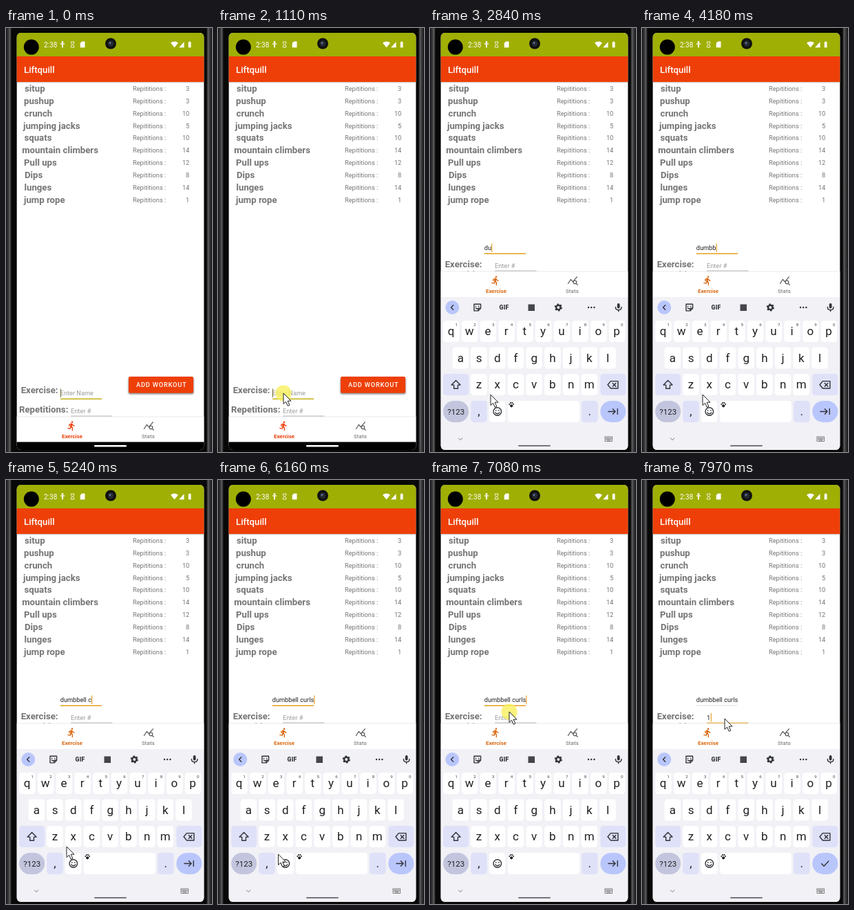
An HTML page that plays this animation: 299 px wide and 613 px high, repeating every 8 s.

```html
<!DOCTYPE html>
<html lang="en">
<head>
<meta charset="utf-8">
<title>Workout tracker</title>
<style>
html, body { margin: 0; width: 100%; height: 100%; overflow: hidden; background: #1d1d1f; }
svg { display: block; font-family: Roboto, sans-serif; }
text { white-space: pre; }
.b { font-weight: 700; font-size: 13.2px; fill: #757575; }
.s { font-size: 9.24px; fill: #757575; }
.hint { fill: #9b9b9b; }
.key { font-size: 17px; fill: #202124; text-anchor: middle; }
.ic { fill: none; stroke: #303338; stroke-width: 1.4; stroke-linecap: round; stroke-linejoin: round; }
</style>
</head>
<body>
<svg id="stage" width="299" height="613" viewBox="0 0 299 613">
  <defs>
    <clipPath id="screen"><rect x="15.7" y="7" width="271.6" height="603" rx="6"/></clipPath>
    <clipPath id="page"><rect id="pageBox" x="15" y="78" width="273" height="484"/></clipPath>
    <linearGradient id="rim">
      <stop offset="0" stop-color="#161618"/>
      <stop offset=".45" stop-color="#3c3c3e"/>
      <stop offset=".7" stop-color="#5c5c5e"/>
      <stop offset="1" stop-color="#0a0a0a"/>
    </linearGradient>
    <linearGradient id="shade" x2="0" y2="1">
      <stop offset="0" stop-opacity=".22"/>
      <stop offset="1" stop-opacity="0"/>
    </linearGradient>
    <filter id="blur" x="-10%" y="-30%" width="120%" height="170%"><feGaussianBlur stdDeviation="1.2"/></filter>
  </defs>
  <rect width="299" height="613" fill="#080808"/>
  <rect width="8" height="613" fill="url(#rim)"/>
  <rect width="8" height="613" fill="url(#rim)" transform="translate(299 0) scale(-1 1)"/>
  <g clip-path="url(#screen)">
    <rect x="15" y="7" width="273" height="603" fill="#fff"/>
    <rect x="15" y="7" width="273" height="34.5" fill="#a0af04"/>
    <rect x="15" y="41" width="273" height="37" fill="#ee3f09"/>
    <rect x="15" y="78" width="273" height="2.2" fill="url(#shade)"/>
    <text x="26" y="65" font-size="13.2" font-weight="500" fill="#fff">Liftquill</text>

    <!-- status bar -->
    <circle cx="36.8" cy="27.6" r="11" fill="#000"/>
    <circle cx="152" cy="22.5" r="8" fill="#111"/>
    <circle cx="152" cy="22.5" r="4.2" fill="#242a35"/>
    <circle cx="151" cy="21.5" r="1.5" fill="#62708a"/>
    <text x="55" y="27.5" font-size="10" fill="#fff">2:38</text>
    <g fill="#fff">
      <circle cx="82" cy="20.5" r="1.4"/>
      <path d="M78.8 22.3h6.4v1.2h-2.2v4.7h-2v-4.7h-2.2z"/>
      <path d="M94.3 20h4.6v1.5l-1.7 2.4 1.7 2.4v1.5h-4.6v-1.5l1.7-2.4-1.7-2.4z" fill="none" stroke="#fff" stroke-width=".9"/>
      <path d="M110.2 19.5h4.3v8.7h-6.8v-6.2z"/>
      <path d="M239 21.5q5.5-4 11 0l-5.5 6.8zM251 28.2l7.5-8.2v8.2zM264.7 20.3h1v-.9h1.8v.9h1v7.9h-3.8z"/>
    </g>

    <g id="list"></g>

    <g clip-path="url(#page)">
      <text id="label1" class="b" x="21.7" y="528">Exercise:</text>
      <text id="label2" class="b" x="19" y="555.5">Repetitions:</text>
      <g id="button">
        <rect x="177.5" y="505.5" width="95" height="24" rx="2.5" opacity=".45" filter="url(#blur)"/>
        <rect x="178" y="504" width="94" height="23.8" rx="2.2" fill="#ee3f09"/>
        <text x="189" y="519.3" font-size="9.24" font-weight="500" letter-spacing=".82" fill="#fff">ADD WORKOUT</text>
      </g>
      <g id="form">
        <text id="name" class="s" x="78.7" y="531.3"></text>
        <rect id="line1" x="79" y="535.6" width="60"/>
        <text id="reps" class="s" x="94" y="556.6"></text>
        <rect id="line2" x="94" y="560.7" width="60.5"/>
        <rect id="caret" width="1.1" height="12.5"/>
      </g>
    </g>

    <g id="nav">
      <rect x="15" y="562" width="273" height="37.3" fill="#fff"/>
      <rect x="15" y="561.6" width="273" height=".8" fill="#e4e4e4"/>
      <g id="active">
        <path transform="translate(87.4 567.6) scale(.64)" d="M13.5 5.5c1.1 0 2-.9 2-2s-.9-2-2-2-2 .9-2 2 .9 2 2 2zm-3.6 13.9l1-4.4 2.1 2v6h2v-7.5l-2.1-2 .6-3c1.3 1.5 3.3 2.5 5.5 2.5v-2c-1.9 0-3.5-1-4.3-2.4l-1-1.6c-.4-.6-1-1-1.7-1-.3 0-.5.1-.8.1L6 8.3V13h2V9.6l1.8-.7-1.6 8.1-4.9-1-.4 2z"/>
        <text x="96" y="593" font-size="7.92" font-weight="700" text-anchor="middle">Exercise</text>
      </g>
      <g class="ic" style="stroke:#666">
        <path d="M200.5 579.5l3.8-6 3 3.4 6-7M212.2 579.2l2 2.2"/>
        <circle cx="210.4" cy="577.4" r="2.3"/>
      </g>
      <text x="206.5" y="593" font-size="7.92" letter-spacing=".2" fill="#666" text-anchor="middle">Stats</text>
    </g>
    <rect id="bar" x="15" y="598.5" width="273" height="12" fill="#000"/>
    <g id="kb"></g>
    <rect id="pill" x="128" y="603" width="47" rx="1"/>
    <g id="barIcons" class="ic" style="stroke:#777;stroke-width:1">
      <path d="M41.5 593l2.7 2.7 2.7-2.7"/>
      <path d="M254 591h10.5v6.5H254zM255.6 593h7.5M255.6 594.6h7.5M257 596.2h4.5" stroke-dasharray="1.1 .7"/>
    </g>
  </g>
  <circle id="halo" r="11.6" fill="#f8f05c" opacity=".8"/>
  <path id="mouse" d="M0 0V15.5L3.6 12.2 6.2 18.3 8.8 17.2 6.2 11.2H11z" fill="#fff" stroke="#222" stroke-width="1" stroke-linejoin="round"/>
</svg>
<script>
const $ = id => document.getElementById(id);
const NS = 'http://www.w3.org/2000/svg';

function add(parent, tag, attrs, text) {
  const el = document.createElementNS(NS, tag);
  for (const k in attrs) el.setAttribute(k, attrs[k]);
  if (text !== undefined) el.textContent = text;
  parent.append(el);
  return el;
}
function set(id, attrs) {
  for (const k in attrs) $(id).setAttribute(k, attrs[k]);
}
const show = (id, on) => set(id, { visibility: on ? 'visible' : 'hidden' });
const within = (t, a, b) => t >= a && t < b;

// Workout list
const workouts = [
  ['situp', 27, 3], ['pushup', 26, 3], ['crunch', 26.5, 10], ['jumping jacks', 25, 5],
  ['squats', 26.5, 10], ['mountain climbers', 23.2, 14], ['Pull ups', 26, 12],
  ['Dips', 27, 8], ['lunges', 26.5, 14], ['jump rope', 26, 1]
];
workouts.forEach(([name, x, count], i) => {
  const y = 92 + i * 17.85;
  add($('list'), 'text', { class: 'b', x, y }, name);
  add($('list'), 'text', { class: 's', x: 184, y: y - 1 }, 'Repititions :');
  add($('list'), 'text', { class: 's', x: 266.3, y: y - 1, 'text-anchor': 'end' }, count);
});

// Keyboard
const kb = $('kb');
const LILAC = '#dfe1f9', BLUE = '#b9c6fc';
const box = (x, y, w, fill = '#fff', rx = 4.5) =>
  add(kb, 'rect', { x, y, width: w, height: 31, rx, fill });
const icon = (d, extra) => add(kb, 'path', { class: 'ic', d, ...extra });
const pitch = 26.72;

add(kb, 'rect', { x: 15, y: 389, width: 273, height: 225, fill: '#f1f1f6' });
add(kb, 'circle', { cx: 32.3, cy: 404, r: 10, fill: BLUE });
icon('M33.8 400.8l-3.2 3.2 3.2 3.2');
icon('M64 399.3h9.6v6l-3.6 3.6h-6zM73.6 405.3h-3.6v3.6M66.6 402.3v.4M70.8 402.3v.4M66.5 405q1.5 1.5 3 .6');
add(kb, 'text', { x: 107.5, y: 407, 'font-size': 8.6, 'font-weight': 900, fill: '#303338', 'text-anchor': 'middle', 'letter-spacing': .3 }, 'GIF');
add(kb, 'rect', { x: 142.5, y: 399.5, width: 9.5, height: 9.5, fill: '#44464c' });
add(kb, 'circle', { cx: 186.3, cy: 404, r: 3.2, class: 'ic', style: 'stroke-width:2.4' });
add(kb, 'circle', { cx: 186.3, cy: 404, r: 4.8, class: 'ic', style: 'stroke-width:1.6;stroke-linecap:butt', 'stroke-dasharray': '2.5 2.53' });
for (const x of [230, 234.2, 238.4]) add(kb, 'circle', { cx: x, cy: 404, r: 1.2, fill: '#303338' });
add(kb, 'rect', { x: 271.7, y: 398, width: 3.8, height: 7.4, rx: 1.9, fill: '#303338' });
icon('M269.3 403.5q0 4.2 4.3 4.2t4.3-4.2M273.6 407.7v2');

[['qwertyuiop', 31, 423], ['asdfghjkl', 44.3, 461.5], ['zxcvbnm', 71, 500]].forEach(([row, x0, y], r) => {
  [...row].forEach((ch, i) => {
    const x = x0 + i * pitch;
    box(x - 11.8, y, 23.6);
    add(kb, 'text', { class: 'key', x: x - (r ? 0 : .5), y: y + 21.3 }, ch);
    if (!r) add(kb, 'text', { x: x + 5.6, y: y + 7.8, 'font-size': 6.2, fill: '#444' }, (i + 1) % 10);
  });
});
box(19.2, 500, 37, LILAC);
icon('M37.6 509.5l6.4 6.6h-3.5v5.2h-5.8v-5.2h-3.5z');
box(247.3, 500, 37, LILAC);
icon('M262.3 510.6h10.6v10.4h-10.6l-4.3-5.2zM265.2 513.4l4.6 4.8M269.8 513.4l-4.6 4.8');
box(19.2, 539, 37, '#c2c5dd', 15.5);
add(kb, 'text', { x: 37.7, y: 559, 'font-size': 11.5, fill: '#202124', 'text-anchor': 'middle' }, '?123');
box(59.2, 539, 23.6, LILAC);
add(kb, 'text', { class: 'key', x: 71, y: 560 }, ',');
box(86, 539, 23.6);
add(kb, 'circle', { class: 'ic', cx: 97.8, cy: 554.5, r: 5.8 });
icon('M95.7 552.7v.5M99.9 552.7v.5M94.8 556q3 3.6 6 0');
box(112.8, 539, 104.2);
for (const [cx, cy, r] of [[115.3, 544, 1], [117, 542, 1.1], [119.4, 542, 1.1], [121.1, 544, 1], [118.2, 546.3, 2.1]])
  add(kb, 'circle', { cx, cy, r, fill: '#222' });
box(220, 539, 23.6, LILAC);
add(kb, 'text', { class: 'key', x: 231.8, y: 560 }, '.');
box(247.3, 539, 37, BLUE, 15.5);
icon('M258.8 554.5h10M265.3 550.8l3.7 3.7-3.7 3.7M272.2 550.5v8', { id: 'next' });
icon('M260.7 554.8l3.4 3.4 6.8-7.2', { id: 'done' });

// Typing moments, one per letter
const phrase = 'dumbbell curls';
const typed = [2710, 2840, 3110, 3260, 4180, 4440, 4640, 4840, 5040, 5240, 5370, 5500, 5700, 5830];

// Pointer moves: start, end, steps, from x, from y, to x, to y
const moves = [
  [280, 780, 8, 284, 608, 95, 528],
  [2240, 2440, 3, 95, 528, 88, 530],
  [6160, 6940, 12, 87.5, 541, 115, 335],
  [7150, 7290, 3, 115, 335, 117, 346],
  [7490, 7900, 6, 117, 346, 120, 345]
];
function pointer(t) {
  const m = moves.filter(v => t >= v[0]).pop();
  if (!m) return null;
  const [a, b, n, x0, y0, x1, y1] = m;
  const step = Math.min(n - 1, Math.floor((t - a) / (b - a) * (n - 1) + 1e-6));
  const p = a === 6160 ? step / (n - 1) : (step + 1) / n;
  const e = p * p * (3 - 2 * p);
  return [x0 + (x1 - x0) * e, y0 + (y1 - y0) * e];
}

const caretOff = [[500, 1040], [1510, 2240], [3780, 4180], [6330, 6830]];

function field(id, value, hint) {
  $(id).textContent = value || hint;
  $(id).setAttribute('class', value ? 's' : 's hint');
  $(id).style.fill = value ? '#222' : '';
  return value ? $(id).getComputedTextLength() : 0;
}

function draw(t) {
  const up = t >= 1510, second = t >= 7290;
  const lift = up ? -210 : 0;
  const accent = up ? '#e39a12' : '#c2ab0b';

  set('form', { transform: `translate(0 ${lift})` });
  set('nav', { transform: `translate(0 ${lift})` });
  set('active', { fill: up ? '#d9660f' : '#ee3f09' });
  set('pageBox', { height: 484 + lift });
  set('label1', { y: up ? 346 : 528 });
  set('label2', { y: up ? 361 : 555.5 });
  show('button', !up);
  show('bar', !up);
  show('kb', up);
  set('kb', { transform: `translate(0 ${t < 1640 ? 60 : 0})` });
  show('barIcons', t >= 1710);
  set('pill', { fill: t >= 1710 ? '#77777b' : '#fff', height: up ? 2 : 2.6 });
  show('next', up && t < 7490);
  show('done', t >= 7490);

  const w1 = field('name', phrase.slice(0, typed.filter(v => t >= v).length), 'Enter Name');
  const w2 = field('reps', t >= 7970 ? '1' : '', 'Enter #');
  set('line1', { fill: second ? '#d8d8d8' : accent, height: second ? .8 : 1.4 });
  set('line2', { fill: second ? accent : '#8d8d8d', height: second ? 1.4 : .8 });
  set('caret', {
    x: second ? 94 + w2 + .5 : 79 + w1 - .2,
    y: second ? 547 : 521.5,
    fill: up ? accent : '#77722e'
  });
  show('caret', !caretOff.some(([a, b]) => within(t, a, b)));

  const pos = pointer(t);
  show('mouse', !!pos);
  if (pos) {
    set('mouse', { transform: `translate(${pos[0]} ${pos[1]})` });
    set('halo', { cx: pos[0], cy: pos[1] });
  }
  show('halo', within(t, 1040, 1310) || within(t, 7010, 7220));
}

function tick() {
  draw(performance.now() % 8000);
  requestAnimationFrame(tick);
}
tick();
</script>
</body>
</html>
```
